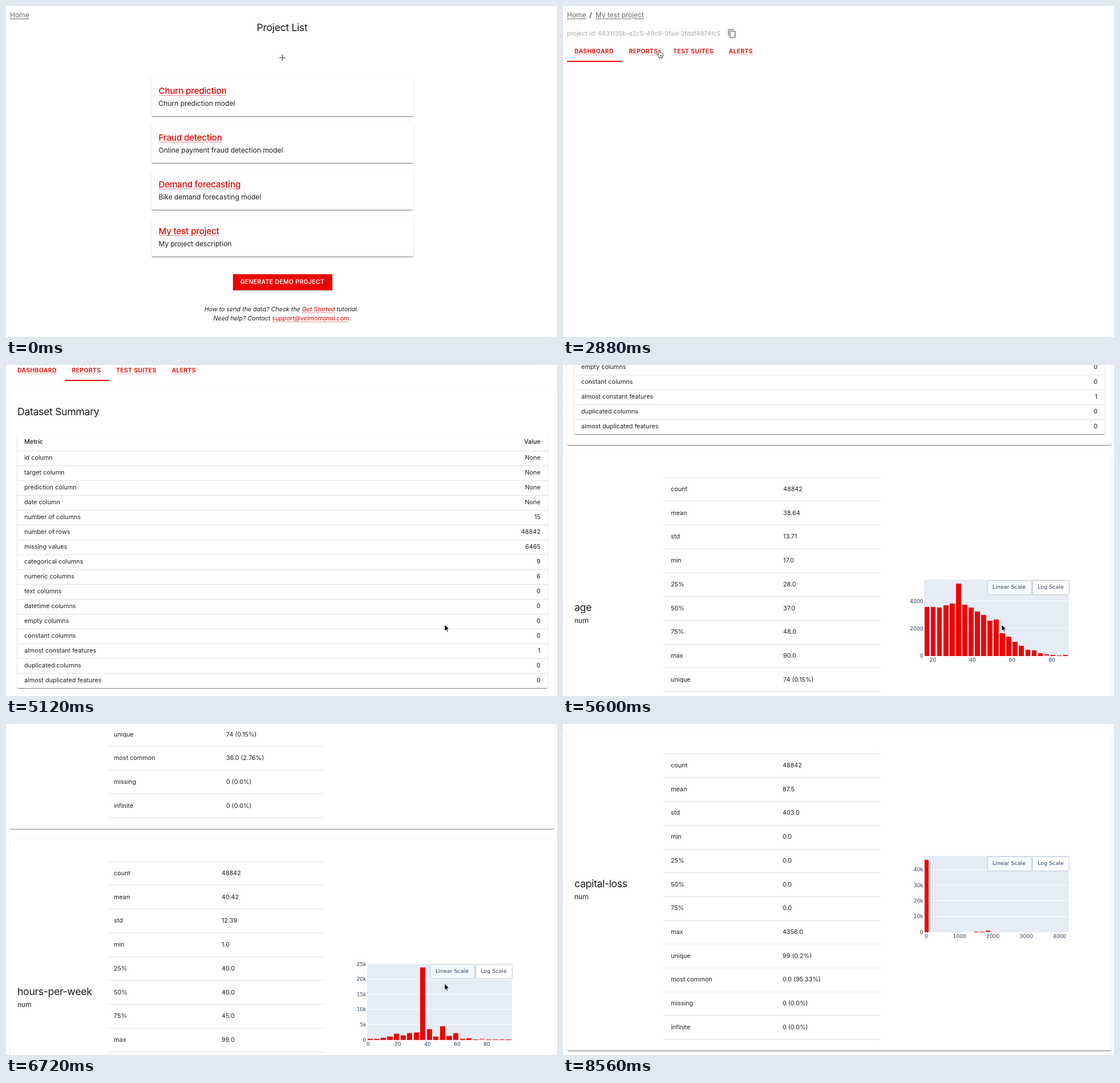
Write an HTML page that moves like this. It is 966x580 px and loops after 8.72 s.

```html
<!DOCTYPE html>
<html lang="en">
<head>
<meta charset="utf-8">
<title>Project list to report</title>
<style>
html, body { margin: 0; width: 100%; height: 100%; overflow: hidden; background: #fff; }
#stage { position: relative; width: 966px; height: 580px; overflow: hidden; color: #1f1f1f;
  font: 10.8px Inter, "Open Sans", sans-serif; }
#stage div, #stage span, #stage svg { position: absolute; }
#stage span { line-height: 20px; white-space: pre; }
.page { left: 0; top: 0; width: 966px; height: 580px; }
.body { font-size: 12.05px; }
.h5 { font-size: 17.8px; letter-spacing: -.4px; }
.h6 { font-size: 15.2px; font-weight: 500; letter-spacing: -.18px; }
.btn { font-size: 10.5px; font-weight: 600; letter-spacing: .31px; }
.th { font-weight: 500; }
.crumb { font-size: 12px; color: #666; }
.link { text-decoration: underline; text-underline-offset: 2px; text-decoration-thickness: 1px; }
.red { color: #dd0400; text-decoration-color: rgba(221, 4, 0, .45); }
.hot .red { text-decoration-color: #dd0400; }
.nav .red { text-decoration-color: rgba(221, 4, 0, .3); }
.help { font-size: 10.7px; font-style: italic; }
.mono { font: 11px "DejaVu Sans Mono", monospace; }
.tick { font: 9.1px "DejaVu Sans", Verdana, sans-serif; color: #2a3f5f; }
.scale { font: 9.5px "DejaVu Sans", Verdana, sans-serif; color: #2a3f5f; }
.mid { transform: translateX(-50%); }
.end { transform: translateX(-100%); }
.paper { background: #fff; border-radius: 3px;
  box-shadow: 0 2px 1px -1px rgba(0,0,0,.3), 0 1px 1px rgba(0,0,0,.2), 0 1px 3px rgba(0,0,0,.16); }
.rule { background: #e0e0e0; }
.plot { background: #e5ecf6; }
.bar { background: #ed0400; }
.opt { box-sizing: border-box; border: 1px solid #bec8d9; border-radius: 2px; background: #fff; }
#halo { background: rgb(250, 215, 90); border-radius: 50%; }
#cursor { left: 0; top: 0; overflow: visible; }
</style>
</head>
<body>
<div id="stage"></div>
<script>
const RED = '#ed0400', GREY = '#666';
const ICON = {
  add: 'M19 13h-6v6h-2v-6H5v-2h6V5h2v6h6z',
  bin: 'M6 19c0 1.1.9 2 2 2h8c1.1 0 2-.9 2-2V7H6v12zM19 4h-3.5l-1-1h-5l-1 1H5v2h14V4z',
  pen: 'M3 17.25V21h3.75L17.81 9.94l-3.75-3.75L3 17.25zM20.71 7.04c.39-.39.39-1.02 0-1.41l-2.34-2.34c-.39-.39-1.02-.39-1.41 0l-1.83 1.83 3.75 3.75 1.83-1.83z',
  copy: 'M16 1H4c-1.1 0-2 .9-2 2v14h2V3h12V1zm3 4H8c-1.1 0-2 .9-2 2v14c0 1.1.9 2 2 2h11c1.1 0 2-.9 2-2V7c0-1.1-.9-2-2-2zm0 16H8V7h11v14z',
  down: 'M20 12l-1.41-1.41L13 16.17V4h-2v12.17l-5.58-5.59L4 12l8 8 8-8z',
  drop: 'M7 10l5 5 5-5z',
  fold: 'M16.6 8.6 12 13.2 7.4 8.6 6 10l6 6 6-6z'
};

// y is the vertical middle of the text line
const text = (x, y, s, cls = '', css = '') =>
  `<span class="${cls}" style="left:${x}px;top:${y - 10}px;line-height:20px;${css}">${s}</span>`;
const box = (x, y, w, h, cls = '', css = '', inner = '') =>
  `<div class="${cls}" style="left:${x}px;top:${y}px;width:${w}px;height:${h}px;${css}">${inner}</div>`;
const icon = (x, y, name, size = 18.9, color = GREY) =>
  `<svg viewBox="0 0 24 24" width="${size}" height="${size}" style="left:${x - size / 2}px;top:${y - size / 2}px">` +
  `<path d="${ICON[name]}" fill="${color}"/></svg>`;
const page = (id, inner) => `<div class="page" id="${id}">${inner}</div>`;

function listPage() {
  const cards = [
    ['Churn prediction', 'Churn prediction model'],
    ['Fraud detection', 'Online payment fraud detection model'],
    ['Demand forecasting', 'Bike demand forecasting model'],
    ['My test project', 'My project description']
  ].map(([name, about], i) => box(255, 124 + 82 * i, 459, 69, 'paper card', '',
    text(12.5, 25, name, 'h6 link red') + text(12.5, 47, about, 'body') +
    '<div class="tools">' + icon(403.5, 19, 'bin') + icon(440.5, 19, 'pen') + '</div>')).join('');
  return text(7, 15.5, 'Home', 'crumb link') +
    text(484, 38, 'Project List', 'h5 mid') + icon(484.5, 90, 'add') + cards +
    box(397.5, 470, 174, 28, '', `background:${RED};box-shadow:0 1px 2px rgba(0,0,0,.3)`) +
    text(484.5, 484, 'GENERATE DEMO PROJECT', 'btn mid', 'color:#fff') +
    text(483, 531.5, 'How to send the data? Check the <a class="link red">Get Started</a> tutorial.', 'help mid') +
    text(484, 547.5, 'Need help? Contact <a class="link red">support@velmorranai.com</a>.', 'help mid');
}

function header(depth, active) {
  const crumbs = ['Home', 'My test project', 'Reports', '4b8fec04-6098-4a51-ad79-a9ece97c9f62'];
  const crumbX = [7, 57, 159, 219];
  const tabs = [['DASHBOARD', 20], ['REPORTS', 115.5], ['TEST SUITES', 193], ['ALERTS', 290.5]];
  return crumbs.slice(0, depth).map((s, i) =>
    (i ? text(crumbX[i] - 8.5, 15.5, '/', 'body mid') : '') + text(crumbX[i], 15.5, s, 'crumb link')).join('') +
    text(7, 48, 'project id: 6631135b-a2c5-49c9-9fad-2fddf4874fc5', '', 'font-size:10.93px;color:#aaa') +
    icon(296.5, 48.5, 'copy', 16.5) +
    '<div class="nav">' + tabs.map(([s, x]) => text(x, 80, s, 'btn link red')).join('') + '</div>' +
    (active ? box(103, 96, 78, 2, 'bar') : box(7, 96, 96, 2, 'bar'));
}

function tablePage() {
  const heads = [['Report ID', 20], ['Tags', 352], ['Metadata', 410.5], ['Timestamp', 641], ['Actions', 802]];
  const code = (x, y, s, color = '#222') => text(x, y, s, 'mono', `color:${color}`);
  return header(3, 1) +
    '<div class="nav">' + box(818, 111, 129, 26, '', 'border:1px solid rgba(221,4,0,.5)') +
    text(884, 125, 'REFRESH REPORTS', 'btn mid', 'color:#d01a1a') + '</div>' +
    text(20, 177, 'Filter by Tags', 'body', 'color:#666') + icon(320, 178, 'drop') +
    text(342, 177, 'Search in Metadata', 'body', 'color:#666') +
    box(20, 189, 310, 1, '', 'background:#949494') + box(342, 189, 357, 1, '', 'background:#949494') +
    box(734, 169.5, 25.5, 11, '', 'background:#9a9a9a;border-radius:6px') +
    box(730, 167.5, 15.5, 15.5, '', 'background:#fff;border-radius:50%;box-shadow:0 1px 2px rgba(0,0,0,.45)') +
    text(768, 175, 'Hide Metadata', 'body') +
    heads.map(([s, x]) => text(x, 225, s, 'th')).join('') + icon(709, 225, 'down', 14) +
    box(7, 247.5, 955, 1, 'rule') + box(7, 351.5, 955, 1, 'rule') +
    text(20, 299.5, '4b8fec04-6098-4a51-ad79-a9ece97c9f62') + icon(261, 300, 'copy', 16.5) +
    code(410.5, 268, '{') + icon(423.5, 269.5, 'fold', 11, '#999') +
    code(421.5, 284, '<b style="font-weight:400;color:#cc0000">metric_presets</b>: [') + icon(540, 285.5, 'fold', 11, '#999') +
    code(432, 300, '0:', '#6b4400') + code(452, 300, '"DataQualityPreset"', '#3a9a3a') +
    code(421.5, 315.5, ']') + code(410.5, 331, '}') +
    text(641, 300, 'Fri, 8 Mar 2024 14:38') +
    '<div id="ripple">' + box(801, 286, 49, 28, '', `background:${RED};border-radius:3px`) + '</div>' +
    text(812, 300, 'VIEW', 'btn link', 'color:#dd0400') +
    text(856, 300, 'DOWNLOAD', 'btn', 'color:#cf0400;letter-spacing:.05px');
}

const CARD = 674, PITCH = 577;
const STATS = ['count', 'mean', 'std', 'min', '25%', '50%', '75%', 'max', 'unique', 'most common', 'missing', 'infinite'];
const FEATURES = [
  { name: 'age', x: 386, step: 11.05, w: 8.7,
    vals: '48842|38.64|13.71|17.0|28.0|37.0|48.0|90.0|74 (0.15%)|36.0 (2.76%)|0 (0.0%)|0 (0.0%)',
    bars: [86, 85.5, 84.5, 89, 92, 127, 89.5, 85, 78, 72, 62, 64, 40, 34, 25, 18, 11, 10, 4.5, 2.3, 1.5, .3, 1.5],
    ys: ['0', '2000', '4000'], dy: 47.8, xs: [20, 40, 60, 80], x0: 648.5, dx: 69.5 },
  { name: 'hours-per-week', x: 378, step: 11.56, w: 9.2,
    vals: '48842|40.42|12.39|1.0|40.0|40.0|45.0|99.0|96 (0.2%)|40.0 (46.69%)|0 (0.0%)|0 (0.0%)',
    bars: [1.5, 2, 4, 5.5, 10.5, 7.5, 12, 12.5, 127, 19, 5.5, 24, 6.5, 11.5, 2, 2.5, .5, 1.2, .4, .3, .2, 1],
    ys: ['0', '5k', '10k', '15k', '20k', '25k'], dy: 26.6, xs: [0, 20, 40, 60, 80], x0: 635, dx: 52 },
  { name: 'capital-loss', x: 385, step: 9.75, w: 7.8,
    vals: '48842|87.5|403.0|0.0|0.0|0.0|0.0|4356.0|99 (0.2%)|0.0 (95.33%)|0 (0.0%)|0 (0.0%)',
    bars: [127, 0, 0, 0, 0, 0, 0, 0, 0, .9, .5, 2.6],
    ys: ['0', '10k', '20k', '30k', '40k'], dy: 27.3, xs: [0, 1000, 2000, 3000, 4000], x0: 637, dx: 58.4 }
];

function chart(f) {
  const base = 350.5;
  const rows = f.ys.map((s, i) => {
    const y = base - i * f.dy;
    return (i ? box(632.5, y - .5, 254, 1, '', 'background:#fff') : '') + text(631.5, y, s, 'tick end');
  }).join('');
  return box(632.5, 217, 254, 133.5, 'plot') + rows +
    f.bars.map((h, i) => h ? box(633.7 + i * f.step, base - h, f.w, h, 'bar') : '').join('') +
    f.xs.map((s, i) => text(f.x0 + i * f.dx, 357.5, s, 'tick mid')).join('') +
    box(743.5, 217.5, 78, 26.5, 'opt', 'background:#f4faff') + text(782, 230, 'Linear Scale', 'scale mid') +
    box(822.5, 217.5, 65, 26.5, 'opt') + text(855, 230, 'Log Scale', 'scale mid');
}

function feature(f, i) {
  const vals = f.vals.split('|'), row = 41.7;
  const stats = STATS.map((s, k) => text(189, 59 + k * row, s) + text(f.x, 59 + k * row, vals[k])).join('');
  const rules = Array.from({ length: 13 }, (_, k) => box(177, 37.7 + k * row, 380, 1, 'rule')).join('');
  const top = CARD + i * PITCH;
  return box(7, top, 955, 557.5, 'paper') + box(0, top, 966, 558, '', '',
    rules + stats + text(20, 266, f.name, 'h5') + text(20, 289, 'num', 'body') + chart(f));
}

function reportPage() {
  const rows = [['id column', 'None'], ['target column', 'None'], ['prediction column', 'None'], ['date column', 'None'],
    ['number of columns', 15], ['number of rows', 48842], ['missing values', 6465], ['categorical columns', 9],
    ['numeric columns', 6], ['text columns', 0], ['datetime columns', 0], ['empty columns', 0], ['constant columns', 0],
    ['almost constant features', 1], ['duplicated columns', 0], ['almost duplicated features', 0]];
  return header(4, 1) + box(7, 115, 955, 540, 'paper') + text(20, 152, 'Dataset Summary', 'h5') +
    box(20, 190, 930, 446, 'paper') + text(32, 205, 'Metric', 'th') + text(937, 205, 'Value', 'th end') +
    rows.map(([s, v], i) => {
      const y = 233 + 26 * i;
      return box(20, y - 13.5, 930, 1, 'rule') + text(32, y, s) + text(937, y, v, 'end');
    }).join('') + FEATURES.map(feature).join('');
}

const stage = document.getElementById('stage');
stage.innerHTML = page('list', listPage()) + page('dash', header(2, 0)) + page('table', tablePage()) +
  page('report', reportPage()) + '<div id="halo"></div>' +
  '<svg id="cursor" width="1" height="1">' +
  '<path id="arrow" d="M0 0V11.2L2.6 8.8 4.3 12.6 6 11.9 4.4 8.1H7.9Z" fill="#000" stroke="#fff" stroke-width=".8"/>' +
  '<path id="hand" transform="scale(.86)" d="M0 0c1 0 1.4.7 1.4 1.5V6l.3-.8c.9-.5 1.9 0 2 .9.8-.5 1.8 0 2 .9.9-.4 1.9.2 1.9 1.3 0 2.6 0 4-1.4 6.2V16H-.8v-1.5C-2 13-3.5 11-4.6 9.4c-.6-1 .5-1.9 1.5-1.2L-1.4 9.8V1.5C-1.4.7-1 0 0 0ZM1.8 10v3.5M3.9 10v3.5" fill="#fff" stroke="#222" stroke-width="1.1"/></svg>';

const $ = id => document.getElementById(id);
const cards = [...document.querySelectorAll('.card')];
const navs = [...document.querySelectorAll('#table .nav')];

const LOOP = 8720, TICK = 80;
const PAGES = [['list', 0, 1760], ['dash', 1760, 3040], ['table', 3040, 4560], ['report', 4560, LOOP]];
const CLICKS = [1520, 2880, 3920];
// time, x, y, hand
const MOVES = [[240, 560, 40, 0], [560, 520, 150, 0], [1040, 380, 405, 0], [1120, 380, 405, 0], [1280, 344, 394, 1],
  [1760, 344, 394, 0], [2240, 344, 394, 0], [2640, 169, 77, 1], [3360, 169, 77, 0], [3440, 560, 190, 0],
  [3520, 765, 248, 0], [3600, 765, 248, 0], [3840, 826, 303, 1], [4160, 826, 303, 0], [4480, 769, 455, 0]];
const SCROLL = [[4960, 0], [5120, 70], [5360, 340], [5600, 515], [5680, 525], [5920, 525], [6080, 590], [6320, 791],
  [6560, 985], [6800, 1080], [7040, 1210], [7280, 1310], [7360, 1310], [7440, 1319], [7520, 1370], [7600, 1400],
  [7680, 1400], [7840, 1640], [8000, 1814]];

function at(keys, t, col) {
  const n = keys.findIndex(k => k[0] > t);
  if (n < 0) return keys[keys.length - 1][col];
  if (n === 0) return keys[0][col];
  const a = keys[n - 1], b = keys[n];
  return a[col] + (b[col] - a[col]) * (t - a[0]) / (b[0] - a[0]);
}
const clamp = v => Math.max(0, Math.min(1, v));
const show = (el, on) => { el.style.visibility = on ? 'visible' : 'hidden'; };

function draw(now) {
  const t = Math.floor(now % LOOP / TICK) * TICK;
  for (const [id, from, to] of PAGES) $(id).style.display = t >= from && t < to ? 'block' : 'none';

  const x = at(MOVES, t, 1), y = at(MOVES, t, 2);
  const last = MOVES.filter(k => k[0] <= t).pop();
  const hand = !!last && last[3] === 1;
  const fade = t < 240 ? 0 : 1 - clamp((t - 8160) / 400);
  $('cursor').style.transform = `translate(${x}px,${y}px)`;
  $('cursor').style.opacity = fade;
  $('hand').style.display = hand ? 'inline' : 'none';
  $('arrow').style.display = hand ? 'none' : 'inline';

  cards.forEach((card, i) => {
    const top = 124 + 82 * i, over = t >= 240 && t < 1760 && y >= top && y <= top + 69;
    card.querySelector('.tools').style.display = over ? 'block' : 'none';
    card.classList.toggle('hot', over && hand);
  });

  const click = CLICKS.find(c => t > c && t <= c + 240);
  show($('halo'), click !== undefined);
  if (click !== undefined) {
    const step = (t - click) / TICK, r = step === 1 ? 20 : 29;
    const s = $('halo').style;
    s.left = x - r + 'px';
    s.top = y - r + 'px';
    s.width = s.height = 2 * r + 'px';
    s.opacity = [0, .2, .43, .22][step];
  }

  $('ripple').style.opacity = t < 3840 || t > 4240 ? 0 : t < 4000 ? .06 : t > 4160 ? .1 : .22;
  const dim = 1 - .37 * clamp((t - 3920) / 160);
  navs.forEach(n => { n.style.opacity = dim; });
  $('report').style.transform = `translateY(${-at(SCROLL, t, 1)}px)`;
}

function frame() {
  draw(performance.now());
  requestAnimationFrame(frame);
}
frame();
</script>
</body>
</html>
```
